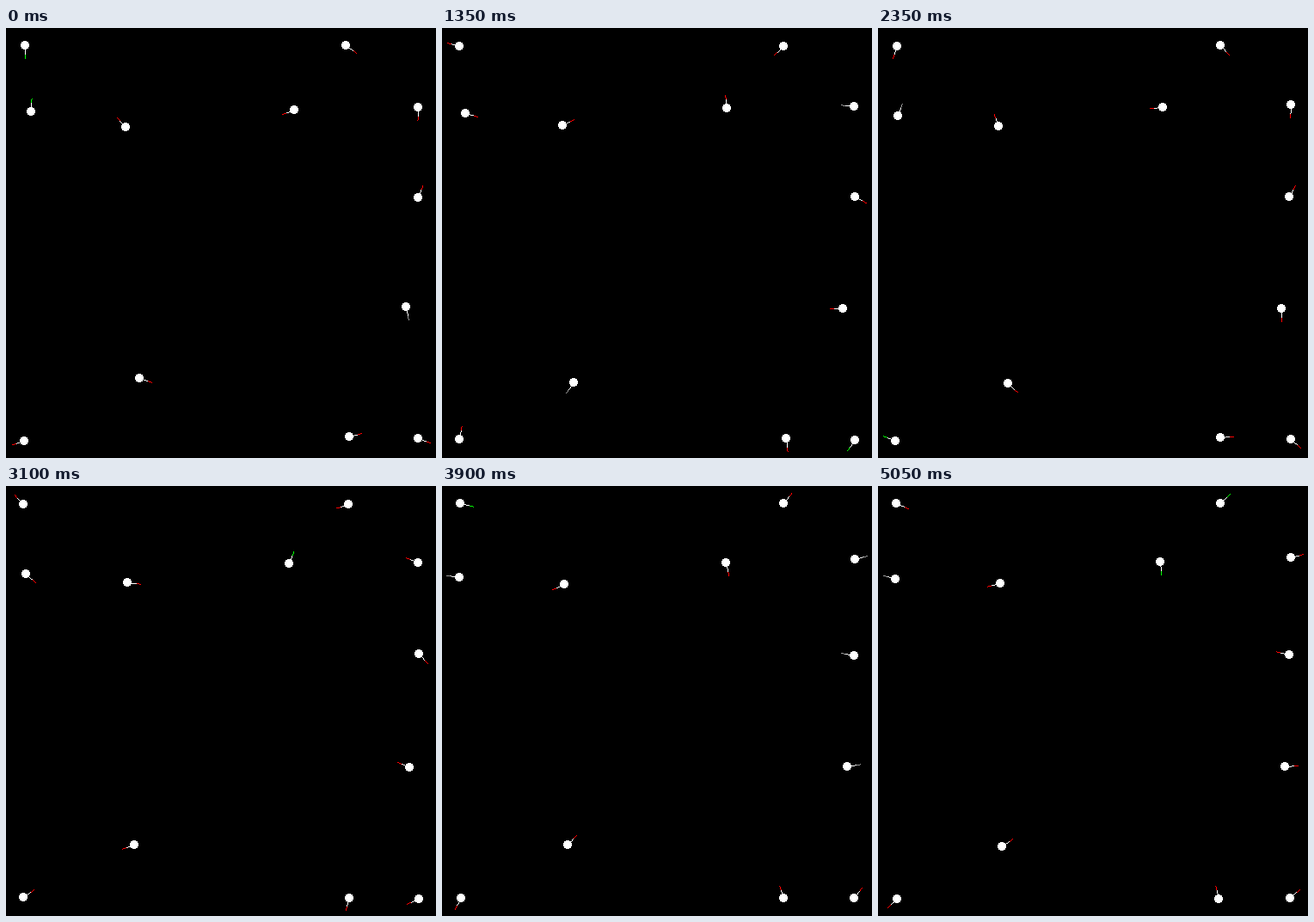
Recreate the animation shown at these times as an HTML page with a canvas. Size 500 by 500 pixels, loop 5.1 s.

```html
<!DOCTYPE html>
<html lang="en">
<head>
<meta charset="utf-8">
<title>Wandering agents</title>
<style>
  html, body { margin: 0; width: 100%; height: 100%; overflow: hidden; background: #000; }
  canvas { display: block; }
</style>
</head>
<body>
<canvas id="stage" width="500" height="500"></canvas>
<script>
const ctx = document.getElementById('stage').getContext('2d');

const LOOP = 5100, STEP = 50, LAST = 100;
const TURN = 31.65;          // shared turn per step, degrees
const ORBIT = 1.2;           // radius of the small circle each agent walks
const NEAR = 20, FAR = 480;  // walls
const RADIUS = 5, FEELER = 15;

// Where each agent starts, and how far it drifts over one loop.
const agents = [
  { x: 20.8, y: 20.2, heading: 90, dx: -0.4, dy: 0, turn: 9 },
  { x: 394.7, y: 20, heading: 35, dx: 4.2, dy: 0, turn: -5 },
  { x: 30, y: 97.5, heading: 272, dx: -13, dy: 9.5, turn: 0 },
  { x: 140.3, y: 114.2, heading: 227, dx: 1.4, dy: -2.3, turn: 14 },
  { x: 334.5, y: 94, heading: 160, dx: -7.5, dy: -6, turn: 0 },
  { x: 478, y: 92.3, heading: 92, dx: 2.5, dy: -8, turn: -32 },
  { x: 480, y: 197.6, heading: 291, dx: -1.3, dy: -2.6, turn: -22 },
  { x: 463.7, y: 324.4, heading: 79, dx: 9.4, dy: 3, turn: -8 },
  { x: 154.3, y: 408.2, heading: 18, dx: -9.3, dy: 12.2, turn: 22 },
  { x: 20.9, y: 478.4, heading: 164, dx: 0, dy: 0.4, turn: 50 },
  { x: 399.2, y: 475.8, heading: 345, dx: -2, dy: 4, turn: -14 },
  { x: 478.4, y: 478, heading: 20, dx: 1.4, dy: 1.6, turn: 12 }
];

const place = v => Math.round(Math.min(FAR, Math.max(NEAR, v)));

// Feelers are mostly red and flicker to green or grey now and then.
function feelerColor(i, step) {
  const s = Math.sin(i * 12.9898 + step * 78.233) * 43758.5453;
  const chance = s - Math.floor(s);
  return chance < 0.07 ? '#0f0' : chance < 0.22 ? '#999' : '#f00';
}

function poseAt(agent, step) {
  const u = step / LAST;
  const angle = (agent.heading + agent.turn * u + TURN * step) * Math.PI / 180;
  return {
    x: place(agent.x + agent.dx * u + ORBIT * Math.sin(angle)),
    y: place(agent.y + agent.dy * u - ORBIT * Math.cos(angle)),
    angle
  };
}

function drawFeeler({ x, y, angle }, color) {
  const dx = FEELER * Math.cos(angle), dy = FEELER * Math.sin(angle);
  const count = Math.round(Math.max(Math.abs(dx), Math.abs(dy)));
  for (let i = 0; i <= count; i++) {
    const u = i / count;
    ctx.fillStyle = u < 0.67 ? '#fff' : color;
    ctx.fillRect(Math.round(x + dx * u), Math.round(y + dy * u), 1, 1);
  }
}

// A hard-edged disc, one pixel row at a time.
function drawBody({ x, y }) {
  ctx.fillStyle = '#fff';
  for (let row = -RADIUS; row < RADIUS; row++) {
    const half = Math.round(Math.sqrt(RADIUS ** 2 - (row + 0.5) ** 2));
    ctx.fillRect(x - half, y + row, half * 2, 1);
  }
}

function draw() {
  const step = Math.max(0, Math.floor(performance.now() % LOOP / STEP) - 1);
  ctx.fillStyle = '#000';
  ctx.fillRect(0, 0, 500, 500);
  agents.forEach((agent, i) => {
    const pose = poseAt(agent, step);
    drawFeeler(pose, feelerColor(i, step));
    drawBody(pose);
  });
  requestAnimationFrame(draw);
}
draw();
</script>
</body>
</html>
```
